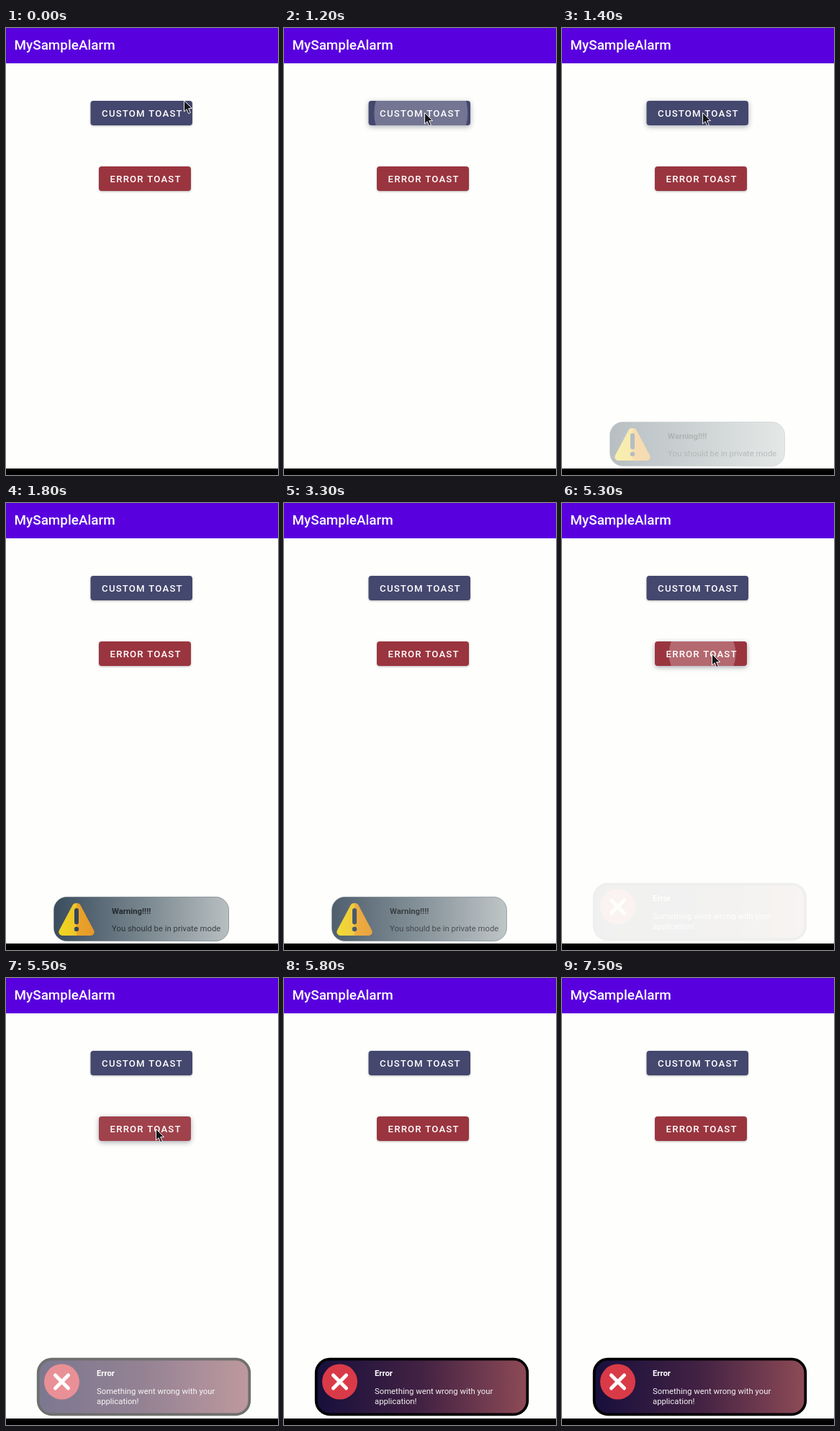
Write an HTML page with a canvas that moves like this. It is 378 px wide and 620 px high and loops after 8000 ms.

```html
<!DOCTYPE html>
<html lang="en">
<head>
<meta charset="utf-8">
<title>Toast demo</title>
<style>
  html, body { margin: 0; width: 100%; height: 100%; overflow: hidden; background: #fefffc; }
  canvas { display: block; }
</style>
</head>
<body>
<canvas id="stage" width="378" height="620"></canvas>
<script>
const W = 378, H = 620, LOOP = 8000, STEP = 100;
const FONT = 'Roboto, "Noto Sans", sans-serif';
const ctx = document.getElementById('stage').getContext('2d');

const clamp = v => Math.max(0, Math.min(1, v));
const smooth = v => { v = clamp(v); return v * v * (3 - 2 * v); };

// Pointer runs: [time, x, y]; hidden outside each run
const RUNS = [
  { end: 1600, keys: [[0, 247, 100], [100, 150, 18], [200, 51, 90], [300, 130, 190],
    [400, 222, 113], [600, 222, 113], [700, 165, 114], [800, 195, 117],
    [1400, 195, 117], [1500, 285, 124]] },
  { end: 5800, from: 4100, keys: [[4100, 373, 139], [4300, 322, 166], [4500, 250, 200],
    [4700, 208, 209], [5600, 208, 209], [5700, 322, 138]] }
];

const BUTTONS = [
  { label: 'CUSTOM TOAST', x: 117.5, y: 101, w: 141.5, color: '#44476e', press: 1100 },
  { label: 'ERROR TOAST', x: 129, y: 192, w: 128, color: '#9a353f', press: 5250 }
];

function box(c, x, y, w, h, r) {
  c.beginPath();
  c.roundRect(x, y, w, h, r);
}

function text(c, str, x, y, size, weight, color, spacing = 0) {
  c.font = `${weight} ${size}px ${FONT}`;
  c.letterSpacing = spacing + 'px';
  c.fillStyle = color;
  c.fillText(str, x, y);
}

function line(c, color, width, ...pts) {
  c.strokeStyle = color;
  c.lineWidth = width;
  c.lineCap = 'round';
  c.beginPath();
  c.moveTo(pts[0], pts[1]);
  c.lineTo(pts[2], pts[3]);
  c.stroke();
}

function across(c, x0, x1, ...colors) {
  const g = c.createLinearGradient(x0, 0, x1, 0);
  colors.forEach((col, i) => g.addColorStop(i / (colors.length - 1), col));
  return g;
}

// Toasts are drawn whole so they can fade as one layer
function layer(draw) {
  const cv = document.createElement('canvas');
  cv.width = W;
  cv.height = H;
  draw(cv.getContext('2d'));
  return cv;
}

function drawWarning(c) {
  box(c, 66.5, 546.5, 243, 61, 18);
  c.fillStyle = across(c, 66, 310, '#3a4c5d', '#77858d', '#b8bfc1');
  c.fill();
  c.strokeStyle = 'rgba(100,112,120,.6)';
  c.lineWidth = 1;
  c.stroke();

  const g = c.createLinearGradient(73, 0, 123, 0);
  g.addColorStop(0, '#f0d71f');
  g.addColorStop(0.5, '#eec52a');
  g.addColorStop(0.5, '#eba52a');
  g.addColorStop(1, '#e6982a');
  c.fillStyle = g;
  c.beginPath();
  c.moveTo(98, 555);
  c.arcTo(102, 555, 123, 594, 6);
  c.arcTo(126, 600, 98, 600, 5);
  c.arcTo(70, 600, 94, 555, 5);
  c.arcTo(94, 555, 98, 555, 6);
  c.closePath();
  c.fill();
  line(c, '#34475b', 6, 98, 565, 98, 581.5);
  line(c, '#34475b', 6.4, 98, 591, 98, 591.1);

  text(c, 'Warning!!!!', 147, 570, 11.32, 700, 'rgba(20,24,28,.82)');
  text(c, 'You should be in private mode', 147, 594, 11.32, 400, 'rgba(20,24,28,.72)');
}

function drawError(c) {
  box(c, 44.7, 528.7, 293.6, 76.6, 19);
  c.fillStyle = across(c, 44, 339, '#170f3c', '#432243', '#8e4b56');
  c.fill();
  c.strokeStyle = '#000';
  c.lineWidth = 3.8;
  c.stroke();

  c.fillStyle = '#d93a47';
  c.beginPath();
  c.arc(77.5, 560, 24.5, 0, 7);
  c.fill();
  line(c, '#fff', 5, 68.5, 551, 86.5, 569);
  line(c, '#fff', 5, 86.5, 551, 68.5, 569);

  text(c, 'Error', 126, 552, 11.32, 700, '#fff');
  text(c, 'Something went wrong with your', 126, 577, 11.32, 400, '#f4f0f2');
  text(c, 'application!', 126, 590.5, 11.32, 400, '#f4f0f2');
}

const warning = layer(drawWarning);
const error = layer(drawError);

function drawButton(b, t) {
  const age = t - b.press;
  const active = age >= 0 && age < 400;
  ctx.save();
  ctx.shadowColor = active ? 'rgba(40,40,70,.4)' : 'rgba(0,0,0,.28)';
  ctx.shadowBlur = active ? 7 : 3;
  ctx.shadowOffsetY = active ? 2 : 1;
  box(ctx, b.x, b.y, b.w, 34, 4);
  ctx.fillStyle = b.color;
  ctx.fill();
  ctx.restore();
  if (active) {
    const fade = 1 - clamp((age - 100) / 200);
    ctx.save();
    box(ctx, b.x, b.y, b.w, 34, 4);
    ctx.clip();
    ctx.fillStyle = `rgba(255,255,255,${0.25 * fade})`;
    ctx.beginPath();
    ctx.arc(b.x + b.w / 2 + 2, b.y + 17, 28 + age * 0.37, 0, 7);
    ctx.fill();
    ctx.restore();
  }
  text(ctx, b.label, b.x + 15.6, b.y + 22, 13.2, 500, '#fff', 1.18);
}

function drawToast(img, alpha) {
  if (alpha <= 0) return;
  ctx.globalAlpha = alpha;
  ctx.drawImage(img, 0, 0);
  ctx.globalAlpha = 1;
}

function pointerAt(t) {
  const run = RUNS.find(r => t >= (r.from || 0) && t < r.end);
  if (!run) return null;
  const k = run.keys;
  const i = k.findIndex(p => p[0] > t);
  if (i < 0) return k[k.length - 1].slice(1);
  const [t0, x0, y0] = k[i - 1], [t1, x1, y1] = k[i];
  const p = (t - t0) / (t1 - t0);
  return [x0 + (x1 - x0) * p, y0 + (y1 - y0) * p];
}

function drawPointer(t) {
  const pos = pointerAt(t);
  if (!pos) return;
  ctx.save();
  ctx.translate(pos[0] + 0.5, pos[1] + 0.5);
  ctx.beginPath();
  [[0, 0], [0, 15.5], [3.6, 12.2], [6.2, 18.2], [8.8, 17], [6.2, 11.2], [11, 11]]
    .forEach(p => ctx.lineTo(...p));
  ctx.closePath();
  ctx.fillStyle = '#17171c';
  ctx.fill();
  ctx.strokeStyle = '#f4f4f4';
  ctx.lineWidth = 1;
  ctx.stroke();
  ctx.restore();
}

function render(now) {
  const t = Math.floor((now % LOOP) / STEP) * STEP;
  ctx.fillStyle = '#fefffc';
  ctx.fillRect(0, 0, W, H);
  ctx.fillStyle = '#5900df';
  ctx.fillRect(0, 0, W, 49);
  text(ctx, 'MySampleAlarm', 11.5, 30, 18.9, 500, '#fff');

  BUTTONS.forEach(b => drawButton(b, t));
  drawToast(warning, smooth((t - 1200) / 500) - smooth((t - 3200) / 500));
  drawToast(error, smooth((t - 5230) / 500));

  ctx.fillStyle = '#000';
  ctx.fillRect(0, 611, W, 9);
  drawPointer(t);
}

function tick() {
  render(performance.now());
  requestAnimationFrame(tick);
}
tick();
</script>
</body>
</html>
```
